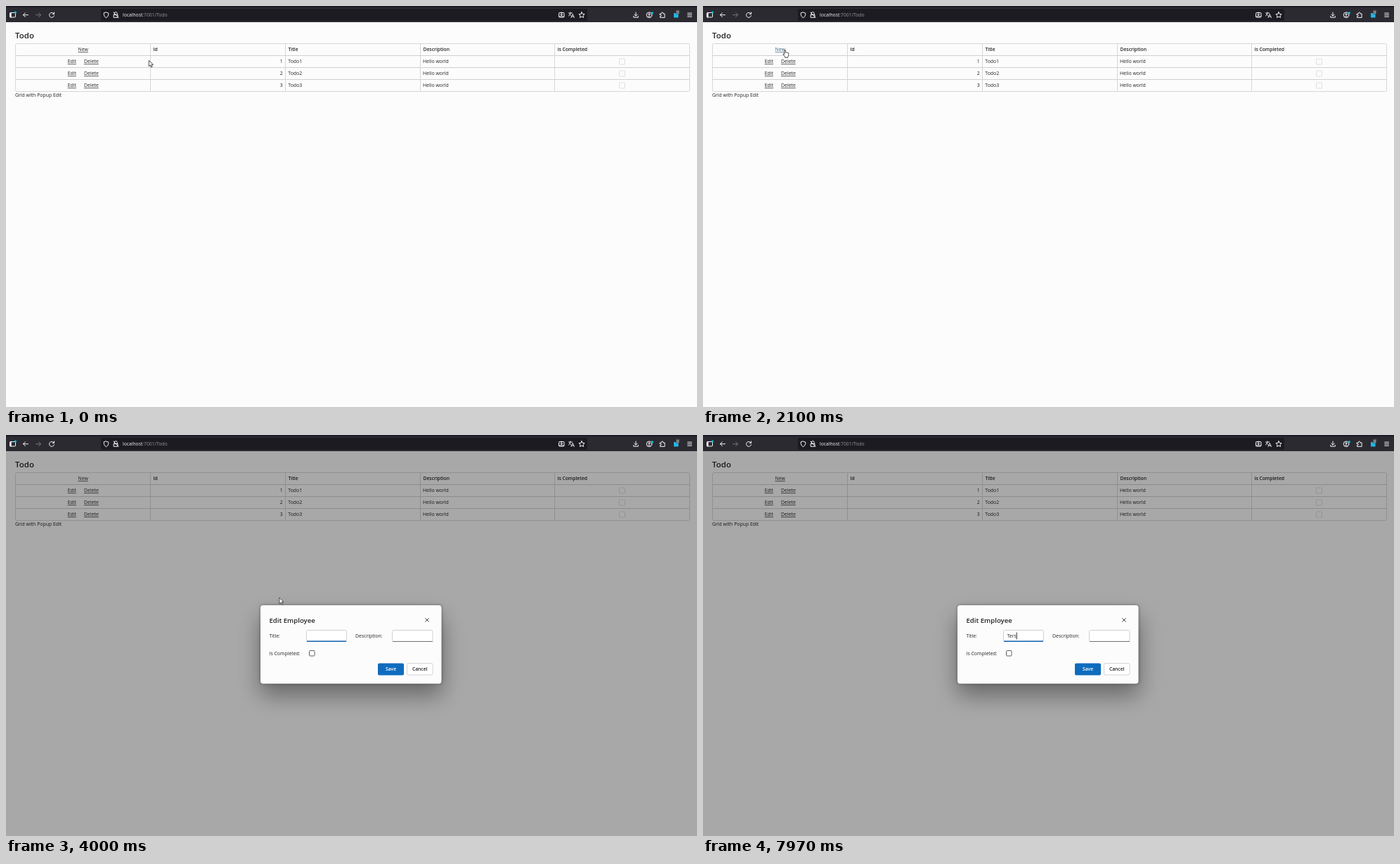
An HTML page that plays this animation: 983 px wide and 570 px high, repeating every 8000 ms.

```html
<!DOCTYPE html>
<html lang="en">
<head>
<meta charset="utf-8">
<title>Todo</title>
<style>
  html, body { margin: 0; width: 100%; height: 100%; overflow: hidden; background: #fcfcfd; }
  svg { display: block; width: 983px; height: 570px; }
  text { font: 6.9px "Open Sans", "Noto Sans", sans-serif; fill: #242424; white-space: pre; }
  .strong { font-weight: 600; font-size: 6.75px; }
  .link { text-decoration: underline; }
  .link.hover { fill: #3b6585; }
  .icon { fill: none; stroke: #f4f4f8; stroke-width: 1; stroke-linecap: round; stroke-linejoin: round; }
  .pointer { fill: #fff; stroke: #222; stroke-width: .8; stroke-linejoin: round; }
  .hidden { display: none; }
</style>
</head>
<body>
<svg viewBox="0 0 983 570">
  <defs>
    <filter id="blur" x="-30%" y="-60%" width="160%" height="220%"><feGaussianBlur stdDeviation="16"/></filter>
    <filter id="edge" x="-10%" y="-20%" width="120%" height="140%"><feGaussianBlur stdDeviation="2"/></filter>
  </defs>

  <rect width="983" height="570" fill="#fcfcfd"/>
  <g id="page">
    <text x="13" y="45.7" style="font-size:11.5px;font-weight:600">Todo</text>
    <text x="13" y="129.2">Grid with Popup Edit</text>
  </g>

  <rect id="overlay" y="23" width="983" height="547" opacity=".335"/>

  <g id="dialog">
    <rect x="362" y="259" width="258" height="111" rx="4" opacity=".38" filter="url(#blur)"/>
    <rect x="362" y="242" width="258" height="111.5" rx="4" opacity=".35" filter="url(#edge)"/>
    <rect x="362" y="242" width="257.5" height="111.5" rx="4" fill="#fcfcfd"/>
    <text x="374.5" y="267" style="font-size:9.6px;font-weight:600">Edit Employee</text>
    <rect x="529" y="324.5" width="37" height="17" rx="2" fill="#0f6cbd"/>
    <text class="strong" x="547.5" y="335.4" text-anchor="middle" style="fill:#fff">Save</text>
    <rect x="570.5" y="324.5" width="36.5" height="16.5" rx="2" fill="#fff" stroke="#d4d4d6"/>
    <text class="strong" x="588.7" y="335.4" text-anchor="middle">Cancel</text>
    <g id="form">
      <path d="M596.3 260.3l5.4 5.4m0-5.4l-5.4 5.4" stroke="#333" stroke-width=".9"/>
      <text x="374.5" y="288.2">Title:</text>
      <text x="497" y="288.2">Description:</text>
      <text x="374.5" y="313">Is Completed:</text>
      <g fill="#fff" stroke="#d1d1d3">
        <rect x="427.5" y="277.5" width="57" height="16" rx="2"/>
        <rect x="549.5" y="277.5" width="57.5" height="16" rx="2"/>
        <rect x="431.5" y="306.5" width="7.5" height="7.5" rx="1" stroke="#606060"/>
      </g>
      <path d="M428 293.2h56" stroke="#0f5fae" stroke-width="1.4"/>
      <path d="M550 293.5h57" stroke="#66666a" stroke-width=".9"/>
      <text id="entry" x="432.5" y="288.2"></text>
      <path id="caret" d="M0 280.5v10" stroke="#222" stroke-width=".9"/>
    </g>
  </g>

  <g id="toolbar">
    <rect width="983" height="23" fill="#2b2a31"/>
    <rect width="983" height="2" fill="#1c1b25"/>
    <rect x="135" y="4" width="692" height="17" rx="2" fill="#1c1b21"/>
    <text x="166" y="15.3" style="font-size:6.75px;fill:#f4f4f8">localhost<tspan fill="#96969c">:7001/Todo</tspan></text>
    <g class="icon">
      <rect x="5.5" y="9.5" width="8" height="6.5" rx="1"/>
      <path d="M6.7 10v5.5" stroke-width="2"/>
      <path d="M31.5 12.7h-7m3-3l-3 3l3 3"/>
      <path d="M42.5 12.7h7m-3-3l3 3l-3 3" stroke="#77767d"/>
      <path d="M67.7 10.5a3.5 3.5 0 1 0 .8 3.2M68.6 9v2.4h-2.4"/>
      <path d="M142.5 9l3.3 1.2c.2 3-.8 5.2-3.3 6.5c-2.5-1.3-3.5-3.5-3.3-6.5z"/>
      <path d="M154.2 12v-1.4a2 2 0 0 1 4 0v1.4M153.5 12.5h5.5v3.8h-5.5zM153 9l7 7.5"/>
      <rect x="786.5" y="9.5" width="7.5" height="6.5" rx="1"/>
      <path d="M790.2 9v4.5m-1.7-1.7l1.7 1.7l1.7-1.7M787 15h6.5"/>
      <path d="M800.5 10h5M803 9v1c0 2-1 3.2-2.5 4M801.5 11.5c.8 1.3 1.5 1.9 2.5 2.5M804 16.5l2.2-5l2.2 5M804.8 15h2.8" stroke-width=".9"/>
      <path id="star"/>
      <path d="M896 9v5m-2.2-2l2.2 2.2l2.2-2.2M892.8 14.5v1.7h6.5v-1.7"/>
      <circle cx="915" cy="12.8" r="3.8"/>
      <circle cx="915" cy="11.8" r="1.1"/>
      <path d="M912.8 15.3q2.2-2 4.4 0"/>
      <path d="M930.5 11h2v-.8a1.2 1.2 0 0 1 2.4 0v.8h2.2v5.4h-6.6v-1.8h.8a1 1 0 0 0 0-2h-.8z"/>
      <path d="M969.7 10.2h5.8m-5.8 2.5h5.8m-5.8 2.5h5.8"/>
    </g>
    <circle cx="13.4" cy="9" r="1.6" fill="#00c8e8"/>
    <circle cx="919.3" cy="9.8" r="1.6" fill="#00c8e8"/>
    <rect x="950" y="10" width="6.5" height="6.5" fill="#22b6e2"/>
    <rect x="952.8" y="5.5" width="5.6" height="6" rx="1" fill="#4b4a52"/>
    <text x="955.6" y="10.6" text-anchor="middle" style="font-size:5.8px;fill:#fff">0</text>
  </g>

  <g id="cursor">
    <path id="arrow" class="pointer" d="M.3 .3v8.6l2-1.9l1.4 3l1.5-.7l-1.4-2.9h2.6z"/>
    <path id="hand" class="pointer" d="M.3 .9q.8-1 1.6 0v3.3q.9-.7 1.5.1q.9-.6 1.5.2q1-.4 1.3.6v2.4q0 1.6-1 2.6v1.2h-4v-1.2l-2.7-3.3q0-1.3 1-.8l.8.7z"/>
    <path id="beam" d="M-1.8-3.8h1.4l.4.4l.4-.4h1.4M0-3.4v6.8M-1.8 3.8h1.4l.4-.4l.4.4h1.4" fill="none" stroke="#333" stroke-width=".9"/>
  </g>
</svg>

<script>
const LOOP = 8000, OPEN = 3170, FORM = 3300, BLINK = 500;

// time, x, y: the pointer eases between neighbouring stops
const stops = [
  [0, 203, 77], [150, 203, 77], [830, 115.5, 67], [1050, 115.5, 67], [1450, 115.5, 62],
  [3400, 115.5, 62], [4000, 388.5, 231], [4450, 446, 289], [LOOP, 446, 289]
];
const typing = [[7050, "T"], [7250, "Te"], [7450, "Ter"], [7700, "Ters"]];

const $ = id => document.getElementById(id);
const show = (id, on) => $(id).classList.toggle("hidden", !on);

function add(parent, tag, attrs, content = "") {
  const node = document.createElementNS("http://www.w3.org/2000/svg", tag);
  for (const key in attrs) node.setAttribute(key, attrs[key]);
  node.textContent = content;
  return parent.appendChild(node);
}

function buildTable() {
  const page = $("page");
  const columns = [13.5, 205.5, 397.5, 589.5, 780.5, 972.5];
  const label = (x, y, content, attrs) => add(page, "text", { x, y, ...attrs }, content);

  add(page, "rect", { x: 13.5, y: 53.5, width: 959, height: 68, rx: 2, fill: "none", stroke: "#d7d7d9" });
  for (const x of columns.slice(1, -1))
    add(page, "path", { d: `M${x} 54v67`, stroke: "#d7d7d9" });
  for (let row = 1; row < 4; row++)
    add(page, "path", { d: `M14 ${53.5 + row * 17}h958`, stroke: "#d0d0d2" });

  label(102.5, 64.4, "New", { class: "link", id: "new" });
  ["Id", "Title", "Description", "is Completed"].forEach((name, i) =>
    label(columns[i + 1] + 4, 64.4, name, { class: "strong" }));

  for (let row = 1; row < 4; row++) {
    const y = 64.4 + row * 17;
    label(87.7, y, "Edit", { class: "link" });
    label(111, y, "Delete", { class: "link" });
    label(393.7, y, row, { "text-anchor": "end" });
    label(401.3, y, "Todo" + row);
    label(593, y, "Hello world");
    add(page, "rect", { x: 872.5, y: y - 6.4, width: 8, height: 8, rx: 1, fill: "none", stroke: "#dedee0" });
  }
}

function drawStar() {
  const points = Array.from({ length: 10 }, (_, i) => {
    const angle = i * Math.PI / 5 - Math.PI / 2, radius = i % 2 ? 2.1 : 4.3;
    return `${819 + radius * Math.cos(angle)} ${13 + radius * Math.sin(angle)}`;
  });
  $("star").setAttribute("d", "M" + points.join("L") + "z");
}

function pointerAt(t) {
  const i = stops.findIndex(stop => stop[0] > t);
  const [t0, x0, y0] = stops[i - 1], [t1, x1, y1] = stops[i];
  const p = (t - t0) / (t1 - t0), eased = p * p * (3 - 2 * p);
  return [x0 + (x1 - x0) * eased, y0 + (y1 - y0) * eased];
}

function render(t) {
  const [x, y] = pointerAt(t);
  const opened = t >= OPEN;
  const hover = !opened && x < 119 && y < 70;
  const overInput = opened && x > 427 && x < 485 && y > 277 && y < 294;
  const typed = typing.filter(step => step[0] <= t).pop();

  show("overlay", opened);
  show("dialog", opened);
  show("form", t >= FORM);
  $("new").classList.toggle("hover", hover);

  $("entry").textContent = typed ? typed[1] : "";
  const width = typed && t >= FORM ? $("entry").getComputedTextLength() : 0;
  $("caret").setAttribute("transform", `translate(${433 + width} 0)`);
  show("caret", typed || Math.floor((t - FORM) / BLINK) % 2 === 0);

  show("cursor", !typed);
  $("cursor").setAttribute("transform", `translate(${x} ${y})`);
  show("hand", hover);
  show("beam", overInput);
  show("arrow", !hover && !overInput);
}

buildTable();
drawStar();
const start = performance.now();
function tick() {
  render((performance.now() - start) % LOOP);
  requestAnimationFrame(tick);
}
tick();
</script>
</body>
</html>
```
